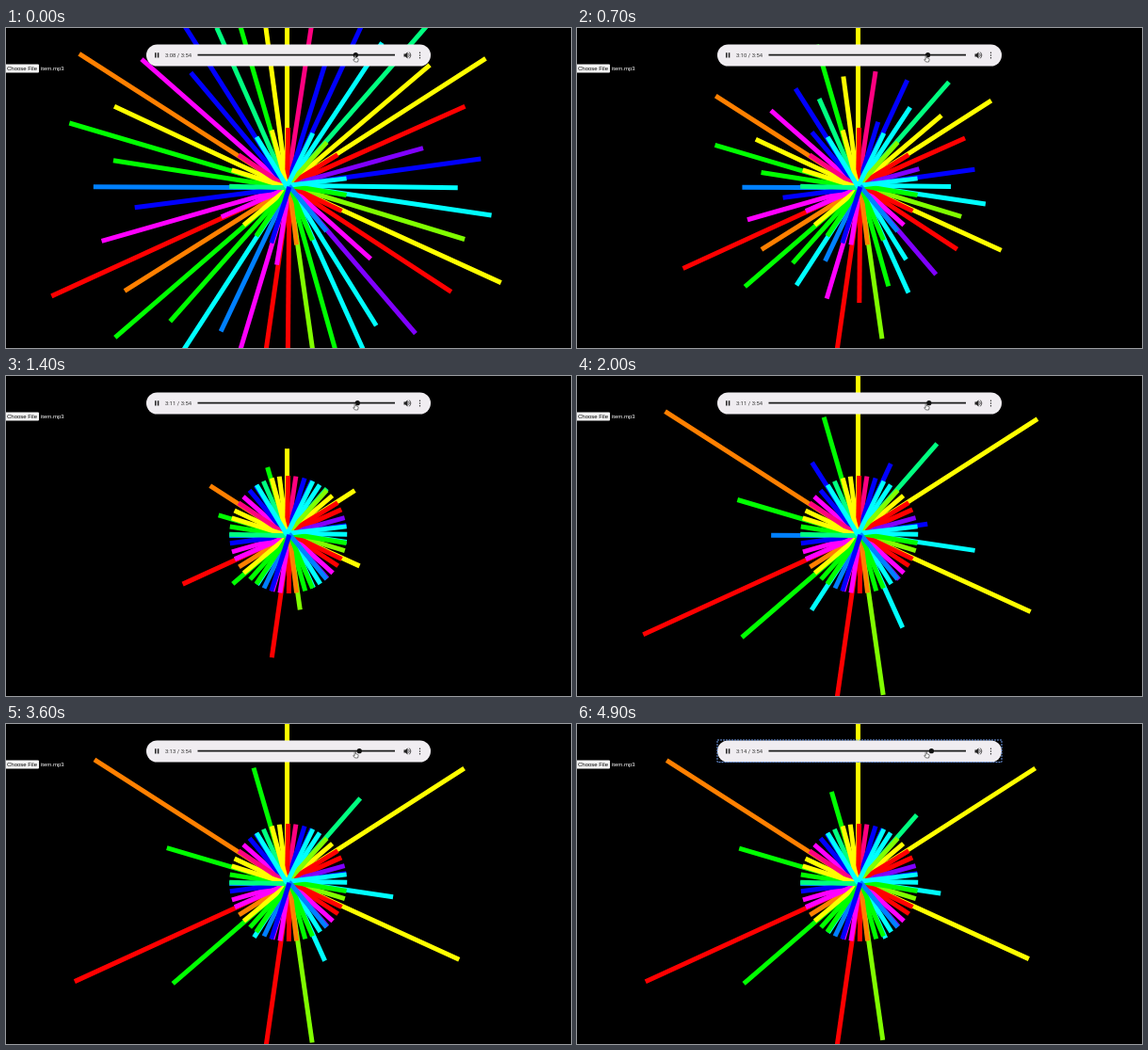
These frames come from a looping animation (600 by 340 pixels, 5 s). An HTML page with a canvas:

```html
<!DOCTYPE html>
<html lang="en">
<head>
<meta charset="utf-8">
<title>Audio visualizer</title>
<style>
html, body { margin: 0; width: 100%; height: 100%; overflow: hidden; background: #000; }
canvas, svg { position: absolute; left: 0; top: 0; width: 600px; height: 340px; }
canvas { filter: blur(.5px); }
.ui { font: 6px "Liberation Sans", Arial, sans-serif; }
#clock { font: 5.9px Roboto, Arial, sans-serif; fill: #333; }
</style>
</head>
<body>
<canvas id="stage" width="600" height="340"></canvas>
<svg viewBox="0 0 600 340">
  <g class="ui">
    <rect x="-1" y="38.5" width="36" height="9" rx="1" fill="#f4f4f4"/>
    <text x="1" y="45.2" fill="#000">Choose File</text>
    <text x="37" y="45.2" fill="#fff">item.mp3</text>
  </g>
  <rect x="149" y="17.5" width="302" height="23" rx="11.5" fill="#f0edf1"/>
  <rect id="focus" x="149" y="17" width="302" height="23.5" fill="none" stroke="#6f9be8" stroke-dasharray="2 1"/>
  <path d="M158.8 26.3v5.2M161.6 26.3v5.2" stroke="#222" stroke-width="1.5"/>
  <text id="clock" x="169" y="31"></text>
  <path d="M203.5 28.7H413" stroke="#1c1c1c" stroke-width="1.8"/>
  <circle id="knob" cy="28.7" r="2.6" fill="#111"/>
  <path d="M422.5 27.5h1.7l2.3-2v7l-2.3-2h-1.7z" fill="#222"/>
  <path d="M427.6 27.2q1.3 1.7 0 3.5M428.2 25.6q3.2 3.4 0 6.7" fill="none" stroke="#222" stroke-width=".8"/>
  <path d="M439.5 26.3h0M439.5 29h0M439.5 31.7h0" stroke="#222" stroke-width="1.4" stroke-linecap="round"/>
  <path d="M370.2 29.5q.8-.7 1.3 0v2.3l2.2.6q.6.3.4 1.3l-.5 2.3h-3.1l-1.8-2.3q.3-.9 1.5 0z" fill="#fff" stroke="#222" stroke-width=".6"/>
</svg>
<script>
const $ = id => document.getElementById(id);
const ctx = $("stage").getContext("2d");
const LOOP = 5000, STEP = 100, BEAT = 1900, RELEASE = 4700;
const BARS = 64, REST = 62.5, LOUDEST = 277, WIDTH = 5, FALL = 0.118;

// Spectrum outlines as [bar, length] key points.
const opening = [[0, 297], [1, 289], [2, 263], [4, 250], [9, 240], [12, 207],
  [26, 206], [36, 180], [42, 149], [44, 84], [45, 78], [46, 0]];
const beat = [[0, 264], [4, 229], [6, 178], [7, 173], [8, 144],
  [11, 134], [13, 105], [15, 102], [18, 74], [19, 0]];

function level(points, i) {
  const k = points.findIndex(p => p[0] > i);
  if (k < 0) return 0;
  const [x0, y0] = points[k - 1], [x1, y1] = points[k];
  return y0 + (y1 - y0) * (i - x0) / (x1 - x0);
}

// After the beat each tone sinks to a held level, higher tones further,
// and all but the lowest let go again at the release.
function beatLevel(i, t) {
  const sink = Math.min(FALL * (t - BEAT), 4 + i ** 3 / 70);
  const fade = i > 8 ? FALL * Math.max(0, t - RELEASE) : 0;
  const wobble = 2 * Math.sin((t - BEAT) / 130 * (1 + i % 3 / 4));
  return level(beat, i) - sink - fade + wobble;
}

function barLength(i, t) {
  const r = t < BEAT ? level(opening, i) - FALL * t : beatLevel(i, t);
  return Math.min(LOUDEST, Math.max(REST, r));
}

function barHue(i) {
  const hue = i * 15;
  return (i % 2 ? Math.round(hue / 60) * 60 : hue) % 360;
}

function draw(t) {
  ctx.setTransform(1, 0, 0, 1, 0, 0);
  ctx.fillStyle = "#000";
  ctx.fillRect(0, 0, 600, 340);
  for (let i = 0; i < BARS; i++) {
    ctx.setTransform(1, 0, 0, 1, 299.7, 168.5);
    ctx.rotate(i + Math.PI - 3);
    ctx.fillStyle = `hsl(${barHue(i)}, 100%, 50%)`;
    ctx.fillRect(1.2 - WIDTH / 2, 0, WIDTH, barLength(i, t));
  }
  // Song position in seconds; it catches up at first.
  const s = t / 1000, pos = Math.min(188.9 + 2 * s, 189.7 + s);
  const sec = String(Math.floor(pos) % 60).padStart(2, "0");
  $("clock").textContent = `3:${sec} / 3:54`;
  $("knob").setAttribute("cx", 202.6 + 209 * pos / 234);
  $("focus").style.display = t >= RELEASE ? "" : "none";
}

const start = performance.now();
function tick(now) {
  const t = Math.max(0, now - start) % LOOP;
  draw(Math.floor(t / STEP) * STEP);
  requestAnimationFrame(tick);
}
tick(start);
</script>
</body>
</html>
```
